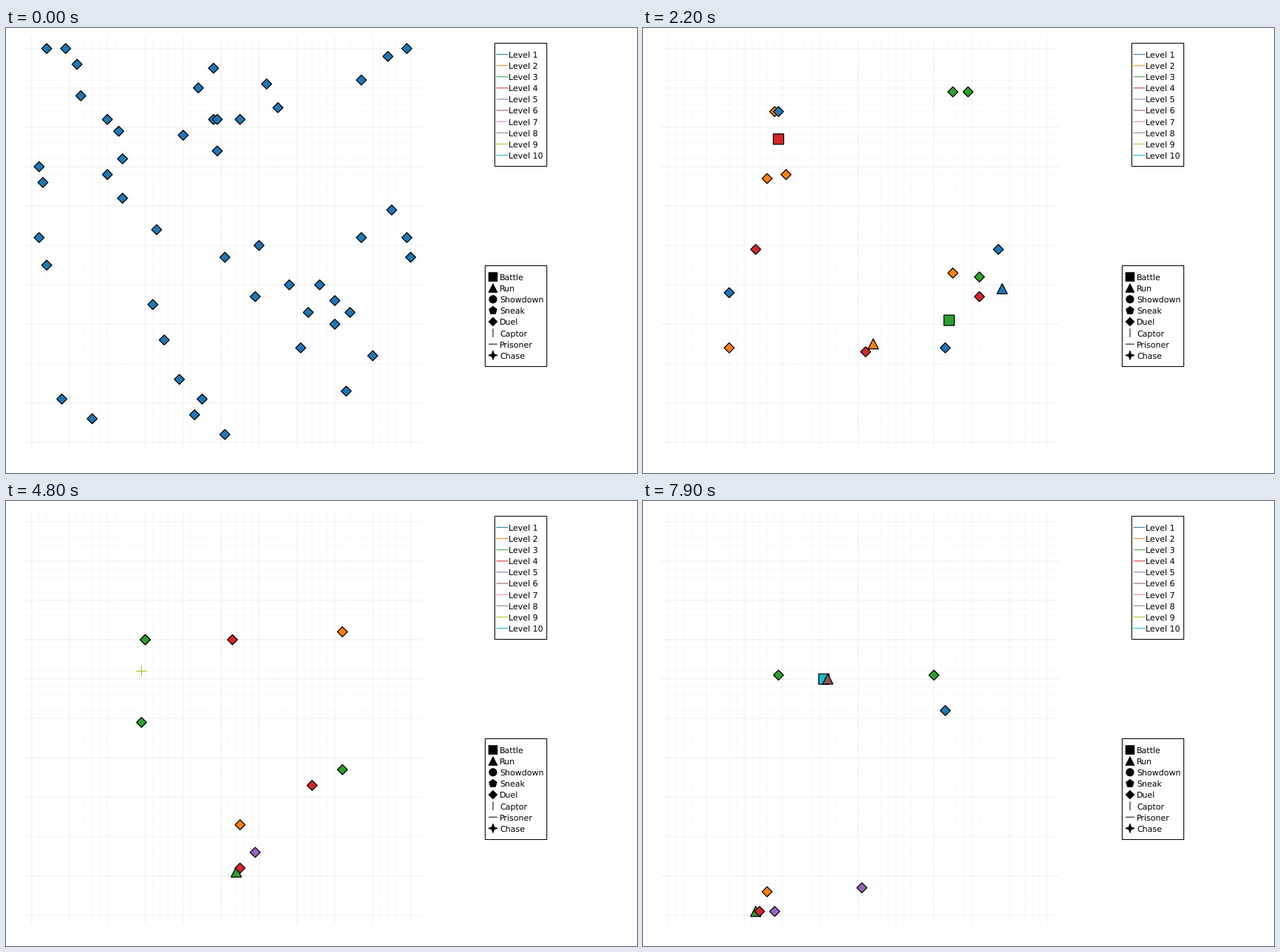
Write a matplotlib script that moves like this. It is 850 px wide and 600 px high and loops after 8000 ms.

```python
import numpy as np
import matplotlib.pyplot as plt
from matplotlib.animation import FuncAnimation
from matplotlib.collections import LineCollection, PathCollection
from matplotlib.patches import Rectangle
from matplotlib.path import Path

W, H, DPI = 850, 600, 100
PX = 72 / DPI
FRAMES, INTERVAL = 80, 100
BEATS = (0, 13, 22, 33, 48, 68, 79)   # moments at which the paths are pinned
HOLD = 2                              # frames a fight lasts
PREY = 28
COLORS = plt.get_cmap("tab10").colors

plt.rcParams.update({"font.family": "DejaVu Sans", "path.snap": False,
                     "text.hinting": "none"})


# ---- marker shapes, in pixels with y down ----
def closed(points):
    return Path(np.vstack([points, points[:1]]), closed=True)


def ring(n, radii):
    a = 2 * np.pi * np.arange(n) / n - np.pi / 2
    return closed(np.c_[np.cos(a), np.sin(a)] * np.resize(radii, n)[:, None])


SHAPES = {
    "D": ring(4, 6.8),
    "s": closed(np.array([(-7, -7), (7, -7), (7, 7), (-7, 7)])),
    "^": closed(np.array([(0, -7), (7, 6.8), (-7, 6.8)])),
    "o": ring(48, 6.1),
    "p": ring(5, 6.6),
    "*": ring(8, [7.2, 2.6]),
    "|": Path([(0, -7), (0, 7)]),
    "-": Path([(-7, 0), (7, 0)]),
    "+": Path([(0, -7), (0, 7), (-7, 0), (7, 0)], [1, 2, 1, 2]),
}


def place(shape, x, y, scale=1.0):
    path = SHAPES[shape]
    return Path(path.vertices * scale + (x, y), path.codes)


def to_px(x, y):
    return 34.4 + 5.107 * x, 558.7 - 5.31 * y


def step(a, b, n):
    """Walk n king's moves from a towards b: diagonal first, then straight."""
    d = np.subtract(b, a)
    return np.add(a, np.sign(d) * np.minimum(n, abs(d)))


def reach(a, b):
    return int(max(abs(np.subtract(b, a))))


class Fighter:
    """Crosses one cell per beat (None glides on); one level per beat."""

    def __init__(self, levels, *cells, poses=""):
        self.levels = [int(c) for c in levels]
        self.poses = poses or "D" * len(levels)
        self.pins = [(t, c) for t, c in zip(BEATS, cells) if c]
        self.end = self.pins[-1][0]
        self.fights = set()

    def cell(self, f):
        for (t0, a), (t1, b) in zip(self.pins, self.pins[1:]):
            if f <= t1:
                return step(a, b, round(reach(a, b) * (f - t0) / (t1 - t0)))
        return np.array(self.pins[-1][1])

    def state(self, f):
        """Cell, level and shape, or None once defeated."""
        if f > self.end + 2 * HOLD:
            return None
        n = len(self.levels)
        level = round(np.interp(f, BEATS[:n], self.levels))
        i = int(np.argmin([abs(f - t) for t in BEATS[:n]]))
        pose = self.poses[i]
        if pose in "so" and abs(f - BEATS[i]) > HOLD:
            pose = "D"
        if f in self.fights or f > self.end:
            pose = "s"
        return self.cell(f), level, pose


def hunted(hunter, start):
    """Trail of a beginner who walks up to its hunter, fights and is gone."""
    cell, trail = np.array(start), []
    for f in range(BEATS[1]):
        goal = hunter.cell(f)
        if reach(cell, goal) <= 1:
            fight = range(f, min(f + HOLD, BEATS[1]))
            hunter.fights.update(fight)
            return trail + [(cell, 0, "s")] * len(fight)
        trail.append((cell, 0, "D"))
        cell = step(cell, goal, 1)
    return trail


fighters = [
    Fighter("0118899", (12, 96), (21, 89), (28, 84), (29, 76), (29, 62),
            (37, 60), (41, 60), poses="DDDo+*s"),
    Fighter("02", (44, 90), (33, 86)),
    Fighter("0223355", (62, 91), (66, 88), (75, 89), (68, 81), (53, 70),
            (41, 60), (42, 60), poses="DDDDD^^"),
    Fighter("0221112", (94, 98), (88, 90), (79, 89), (81, 87), (82, 72),
            (79, 52), (70, 61)),
    Fighter("010", (20, 82), (29, 79), (29, 84), poses="D^D"),
    Fighter("0333222", (40, 78), (29, 76), (29, 77), (28, 74), (30, 70),
            (33, 66), (29, 61), poses="DDssDDD"),
    Fighter("0210", (24, 72), (29, 70), (31, 68), (29, 71), poses="DDD^"),
    Fighter("0011", (24, 62), (22, 60), (26, 67), (29, 73), poses="DDDs"),
    Fighter("00", (3, 66), (16, 60)),
    Fighter("023323", (4, 45), (16, 44), (23, 49), (29, 60), (30, 70),
            (30, 66)),
    Fighter("010", (32, 35), (20, 44), (16, 38)),
    Fighter("011220", (8, 11), (17, 15), None, (16, 34), (29, 49), (28, 61),
            poses="DDDDD^"),
    Fighter("0111210", (60, 50), (66, 50), (75, 43), (82, 43), (82, 37),
            (79, 50), (73, 52)),
    Fighter("0222344", (99, 52), (90, 51), (82, 42), (86, 43), (74, 33),
            (62, 18), (51, 7)),
    Fighter("000", (95, 59), (90, 54), (87, 49), poses="D^D"),
    Fighter("00", (76, 40), (73, 34)),
    Fighter("0000", (80, 36), (81, 32), (88, 39), (84, 43), poses="D^^^"),
    Fighter("0122222", (68, 40), (75, 29), (74, 31), (69, 26), None, None,
            (23, 1), poses="Dss^^^^"),
    Fighter("0334444", (71, 24), (74, 28), (82, 37), (74, 31), None, None,
            (28, 1), poses="DsDDDDD"),
    Fighter("0000", (90, 22), (80, 15), (73, 24), (81, 29)),
    Fighter("0333333", (43, 7), (43, 14), None, (63, 27), (55, 12), None,
            (24, 1)),
    Fighter("0111111", (45, 11), (45, 16), None, (65, 34), (55, 23), (37, 7),
            (26, 6), poses="D^^DD^D"),
]

# Beginners start scattered around the fighter that will beat them.
rng = np.random.default_rng(8)
trails = []
for i in range(PREY):
    hunter = fighters[i % len(fighters)]
    offset = rng.integers(3, 10, 2) * rng.choice([-1, 1], 2)
    trails.append(hunted(hunter, np.clip(hunter.cell(0) + offset, 2, 100)))


# ---- stage ----
fig = plt.figure(figsize=(W / DPI, H / DPI), dpi=DPI, facecolor="white")
ax = fig.add_axes([0, 0, 1, 1])
ax.set_xlim(0, W)
ax.set_ylim(H, 0)
ax.axis("off")


def grid(values, color):
    (x0, y0), (x1, y1) = to_px(-2, -2), to_px(103, 103)
    lines = []
    for v in values:
        x, y = to_px(v, v)
        lines += [[(x, y0), (x, y1)], [(x0, y), (x1, y)]]
    ax.add_collection(LineCollection(lines, colors=color, linewidths=PX,
                                     zorder=1), autolim=False)


def legend_rows(x0, y0, names, text_x):
    """Frame a legend, write its names and yield the row centres."""
    height = 15.1 * (len(names) + 1)
    ax.add_patch(Rectangle((x0, y0), 728.5 - x0, round(height),
                           facecolor="white", edgecolor="black",
                           linewidth=PX, zorder=2))
    for i, name in enumerate(names):
        y = y0 + 15.1 * (i + 1)
        ax.text(text_x, y + 4.2, name, fontsize=11 * PX, zorder=4)
        yield y


grid(range(0, 101, 2), "#f9f9f9")
grid(range(0, 101, 10), "#f2f2f2")

levels = [f"Level {i}" for i in range(1, 11)]
for y, color in zip(legend_rows(658.5, 20.5, levels, 677.5), COLORS):
    ax.plot([661, 676], [y, y], color=color, lw=PX, zorder=3)

actions = {"Battle": "s", "Run": "^", "Showdown": "o", "Sneak": "p",
           "Duel": "D", "Captor": "|", "Prisoner": "-", "Chase": "*"}
rows = legend_rows(645.5, 320.5, list(actions), 665)
icons = [place(s, 656, y, 0.83) for y, s in zip(rows, actions.values())]
icons = PathCollection(icons, facecolors="black", edgecolors="black",
                       linewidths=PX, zorder=3)
ax.add_collection(icons, autolim=False)

marks = PathCollection([place("D", 0, 0)], linewidths=1.25 * PX, zorder=5)
marks.set_joinstyle("miter")
ax.add_collection(marks, autolim=False)


def draw(f):
    states = [s for s in (a.state(f) for a in fighters) if s]
    states += [t[f] for t in trails if f < len(t)]
    paths, faces, edges = [], [], []
    for cell, level, pose in states:
        thin = pose in "|-+"
        paths.append(place(pose, *to_px(*cell)))
        faces.append("none" if thin else COLORS[level])
        edges.append(COLORS[level] if thin else "black")
    marks.set_paths(paths)
    marks.set_facecolor(faces)
    marks.set_edgecolor(edges)
    return [marks]


anim = FuncAnimation(fig, draw, frames=FRAMES, interval=INTERVAL, repeat=True,
                     repeat_delay=0)
plt.show()
```
